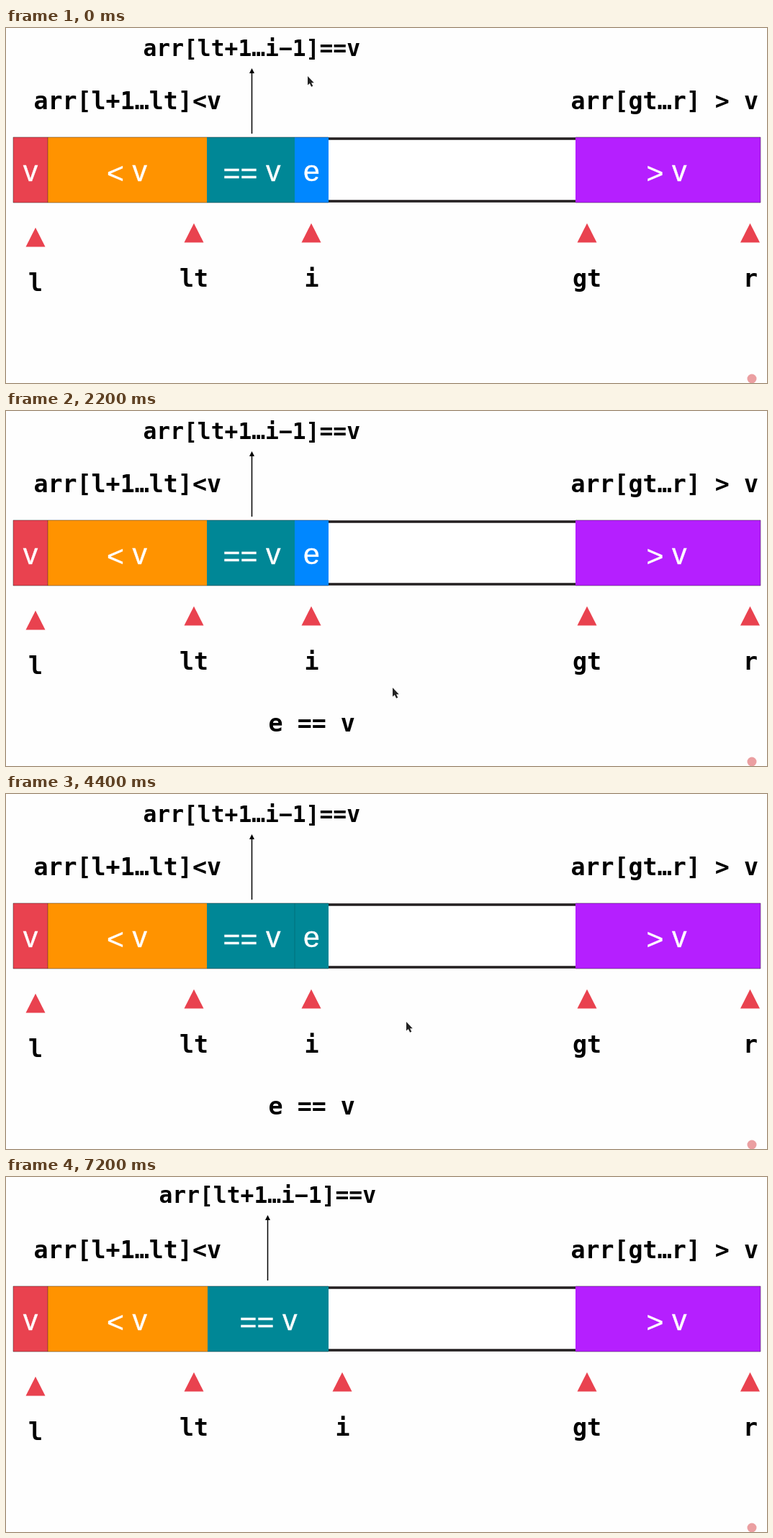
Write an HTML page that moves like this. It is 1057x494 px and loops after 8000 ms.

```html
<!DOCTYPE html>
<html lang="en">
<head>
<meta charset="utf-8">
<title>Three-way partition</title>
<style>
html, body { margin: 0; width: 100%; height: 100%; overflow: hidden; background: #fefefe; }
svg { display: block; width: 100%; height: 100%; }

.code { font: bold 33.3px "DejaVu Sans Mono", monospace; fill: #000; }
.code .wide { font-size: 31.3px; }
.mid { text-anchor: middle; }
.cell { font: 41px "Liberation Sans", Arial, sans-serif; fill: #fff; stroke: #fff; stroke-width: .4; text-anchor: middle; }
.mark { fill: #e9424f; }

/* every part changes in hard 200 ms steps */
.title, .range, .less, .index, .cursor, .test, .current, .letter, .seam {
  animation: 8s step-end infinite;
}
.title { animation-name: title; }
.range { animation-name: range; }
.less { animation-name: less; }
.index { animation-name: index; }
.cursor { animation-name: cursor; }
.test { animation-name: test; }
.current { animation-name: current; }
.letter { animation-name: letter; }
.seam { animation-name: seam; }

@keyframes title { 0% { transform: none; } 80%, 100% { transform: translate(22px, -3px); } }
@keyframes range { 0% { transform: none; } 80%, 100% { transform: translate(23px, 0); } }
@keyframes less { 0% { transform: none; } 80%, 100% { transform: translate(1px, 0); } }
@keyframes test { 0% { opacity: 0; } 12.5% { opacity: 1; } 80%, 100% { opacity: 0; } }
@keyframes current { 0% { opacity: 1; } 32.5%, 100% { opacity: 0; } }
@keyframes letter { 0% { opacity: 1; } 80%, 100% { opacity: 0; } }
@keyframes seam { 0% { opacity: 0; } 32.5% { opacity: 1; } 80%, 100% { opacity: 0; } }
@keyframes index {
  0% { transform: translate(0, 0); }
  57.5% { transform: translate(0, 0); animation-timing-function: steps(3); }
  65% { transform: translate(45.5px, 0); }
  80%, 100% { transform: translate(43px, 0); }
}
@keyframes cursor {
  0% { transform: translate(419px, 67px); opacity: 1; }
  2.5% { transform: translate(435px, 67px); animation-timing-function: steps(4); }
  12.5% { transform: translate(600px, 213px); animation-timing-function: steps(2); }
  17.5% { transform: translate(501px, 266px); animation-timing-function: steps(2); }
  22.5% { transform: translate(444px, 463px); }
  25% { transform: translate(533px, 465px); }
  27.5% { transform: translate(537px, 385px); }
  30% { transform: translate(530px, 378px); animation-timing-function: steps(3); }
  37.5% { transform: translate(446px, 239px); animation-timing-function: steps(2); }
  42.5% { transform: translate(316px, 147px); }
  47.5% { transform: translate(316px, 147px); animation-timing-function: steps(3); }
  55% { transform: translate(556px, 317px); }
  60% { transform: translate(556px, 317px); animation-timing-function: steps(2); }
  65% { transform: translate(540px, 316px); }
  80%, 100% { transform: translate(540px, 316px); opacity: 0; }
}
</style>
</head>
<body>
<svg viewBox="0 0 1057 494" preserveAspectRatio="none">
  <defs>
    <path id="tri" class="mark" d="M0 .8 13.5 27.5H-13.5Z"/>
  </defs>

  <g class="code">
    <g class="title">
      <text class="wide" x="190.5" y="38.6">arr[lt+1…i−1]==v</text>
      <path d="M341.5 147V61" stroke="#000" stroke-width="1.5"/>
      <path d="M341.5 56 345 63H338Z"/>
    </g>
    <text x="38.4" y="113">arr[l+1…lt]&lt;v</text>
    <text x="784.4" y="113">arr[gt…r] &gt; v</text>
    <text class="test" x="364.6" y="445.7">e == v</text>
  </g>

  <!-- array bar -->
  <rect x="448" y="152" width="343" height="91" fill="#fff"/>
  <path d="M448 154H791M448 241H791" stroke="#231f20" stroke-width="3.6"/>
  <rect x="279" y="152" width="169" height="91" fill="#008796"/>
  <rect class="less" x="57" y="152" width="222" height="91" fill="#ff9300"/>
  <rect x="10" y="152" width="48" height="91" fill="#e9424f"/>
  <rect class="current" x="401" y="152" width="47" height="91" fill="#0087ff"/>
  <path class="seam" d="M401 152V243" stroke="#00707d"/>
  <rect x="791" y="152" width="257" height="91" fill="#b51fff"/>
  <path d="M448 152H10V243H448M791 152H1048V243H791M58 152V243"
        fill="none" stroke="#222" stroke-opacity=".45"/>

  <!-- operators sit a little below the letters -->
  <g class="cell">
    <text x="34" y="213">v</text>
    <text x="168" y="216">&lt;<tspan dy="-3"> v</tspan></text>
    <text class="range" x="341.5" y="216">==<tspan dy="-3"> v</tspan></text>
    <text class="letter" x="424.5" y="213">e</text>
    <text x="917.5" y="216">&gt;<tspan dy="-3"> v</tspan></text>
  </g>

  <!-- pointers -->
  <g class="code mid">
    <use href="#tri" x="41" y="277"/><text x="41" y="366">l</text>
    <use href="#tri" x="261" y="271"/><text x="261" y="360">lt</text>
    <use href="#tri" x="807" y="271"/><text x="807" y="360">gt</text>
    <use href="#tri" x="1033.5" y="271"/><text x="1034" y="360">r</text>
    <g class="index">
      <use href="#tri" x="424" y="271"/><text x="424.4" y="360">i</text>
    </g>
  </g>

  <circle cx="1036" cy="488" r="6.5" fill="#eb9fa1"/>

  <g class="cursor">
    <path d="M0 0V12.5L2.8 10 5.1 14.8 7.3 13.7 5.1 9.2H8.8Z"
          fill="#222" stroke="#fff" stroke-width="1.2" paint-order="stroke"/>
  </g>
</svg>
</body>
</html>
```
